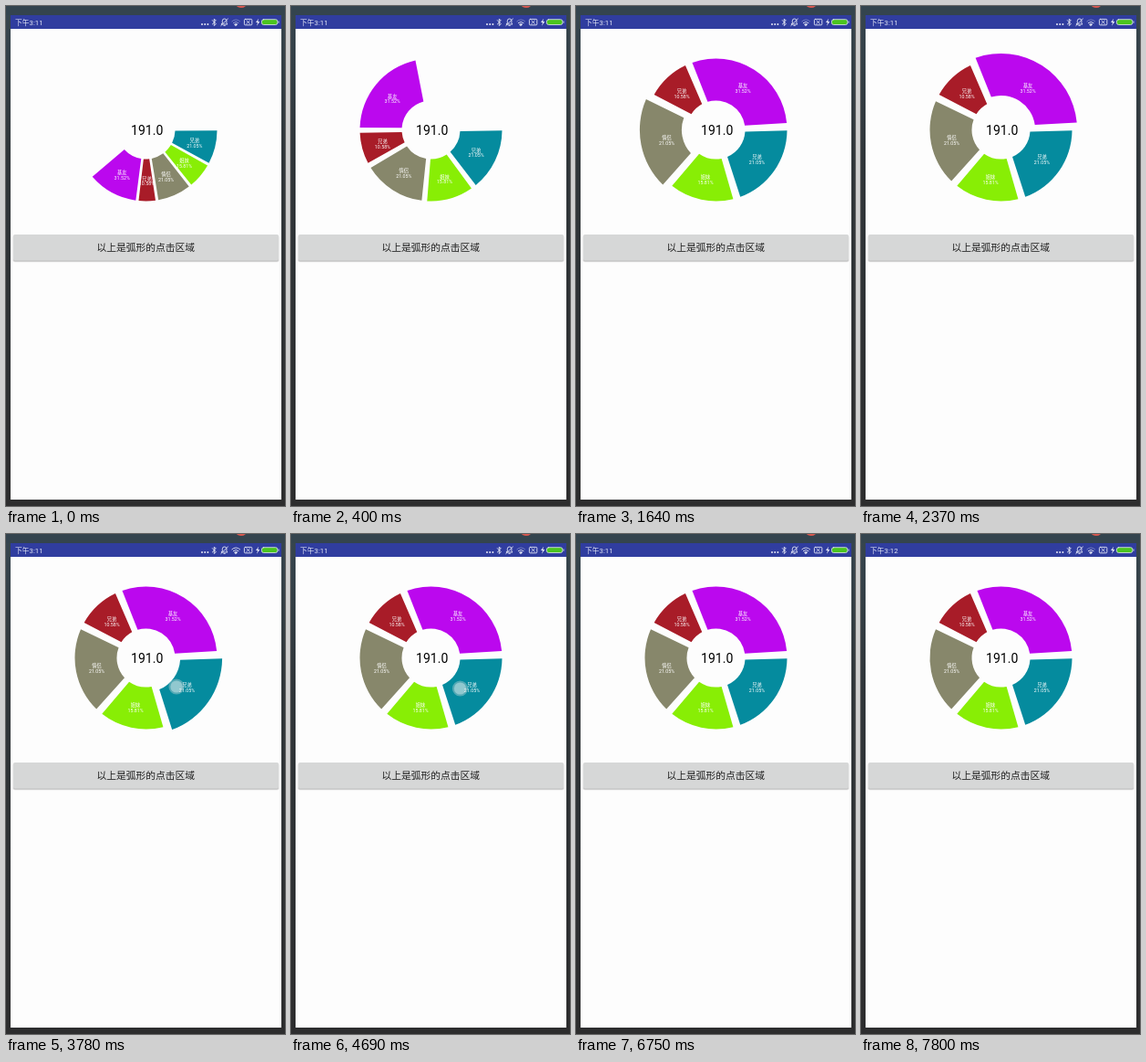
An HTML page for the animation above (8 s loop, 306 by 547 pixels).

```html
<!DOCTYPE html>
<html lang="zh-CN">
<head>
<meta charset="utf-8">
<title>Ring chart</title>
<style>
  html, body { margin: 0; width: 100%; height: 100%; overflow: hidden; background: #2e2e2f; }
  svg { display: block; width: 306px; height: 547px; }
  text { font-family: Roboto, "Noto Sans CJK SC", "Noto Sans CJK", sans-serif; text-anchor: middle; }
  .label { font-size: 5.3px; fill: #fff; }
  .icon { fill: none; stroke: #e4e7f5; stroke-width: .9; stroke-linecap: round; stroke-linejoin: round; }
</style>
</head>
<body>
<svg viewBox="0 0 306 547" xmlns="http://www.w3.org/2000/svg">
  <defs>
    <linearGradient id="edge" x2="0" y2="1">
      <stop offset="0" stop-color="#37464f"/>
      <stop offset=".3" stop-color="#30363a"/>
      <stop offset="1" stop-color="#2d2d2e"/>
    </linearGradient>
  </defs>
  <rect width="306" height="547" fill="url(#edge)"/>
  <rect width="306" height="10" fill="#34444e"/>
  <circle cx="258" cy="-4.5" r="6.6" fill="#d9584f"/>
  <rect x="5" y="10" width="297" height="530" fill="#fdfdfd"/>
  <rect x="5" y="10" width="297" height="15" fill="#303d9f"/>

  <text id="clock" x="10" y="20.8" font-size="7.8" fill="#e4e7f5" style="text-anchor:start"></text>
  <g fill="#e4e7f5">
    <circle cx="215" cy="20" r="1"/><circle cx="218.2" cy="20" r="1"/><circle cx="221.4" cy="20" r="1"/>
    <path d="M277 13.8l-3 4.3h2l-1 3.6 3.3-4.6h-2z"/>
  </g>
  <g class="icon">
    <path d="M226.3 15.6l4 4-2 2v-7.6l2 2-4 4"/>
    <path d="M236.3 20h6.6l-1-1.5v-2.2a2.3 2.3 0 0 0-4.6 0v2.2zM238.9 21.4h1.4M235.8 21.5l7.6-7.5"/>
    <rect x="261.4" y="14.4" width="8.4" height="6.4" rx="1"/>
    <path d="M264 16l3.2 3.2M267.2 16l-3.2 3.2"/>
    <path id="outer" d="M247.8 16.8q4.4-3.8 8.8 0"/>
    <path id="middle" d="M249.3 18.5q2.9-2.4 5.8 0"/>
    <path d="M250.8 20.1q1.4-1.1 2.8 0l-1.4 1.3z" fill="#e4e7f5"/>
    <rect x="280.4" y="14.7" width="17.4" height="5.8" rx="2.2" fill="#4bc41f" stroke-width=".8"/>
    <path d="M299 16.8v1.6" stroke-width=".8"/>
  </g>

  <g id="chart"></g>
  <text x="154.7" y="141.4" font-size="14" fill="#000">191.0</text>

  <rect x="7.5" y="251" width="292" height="29.3" rx="2" fill="#000" opacity=".1"/>
  <rect x="8" y="251" width="291" height="28.4" rx="2" fill="#000" opacity=".16"/>
  <rect x="8" y="250" width="291" height="28.4" rx="1.6" fill="#d6d7d7"/>
  <text x="153.3" y="268.4" font-size="10.75" fill="#202020">以上是弧形的点击区域</text>

  <g id="touch">
    <circle r="8.6" fill="#ddd" opacity=".36"/>
    <circle r="6.6" fill="#fff" opacity=".36"/>
  </g>
</svg>
<script>
const LOOP = 8000, CX = 153.5, CY = 135.5;
const INNER = 32, OUTER = 78, POP = 5.6;
// Degrees: first edge, gap on the outer rim, extra inset of each edge on the inner rim
const START = .5, GAP = 6, INSET = 3;

const slices = [
  { name: '兄弟', pct: 21.05, color: '#058b9e' },
  { name: '姐妹', pct: 15.81, color: '#88ee05' },
  { name: '情侣', pct: 21.05, color: '#87876b' },
  { name: '兄弟', pct: 10.58, color: '#a81c28' },
  { name: '基友', pct: 31.52, color: '#bb08ee' }
];
const [TEAL, GREEN, GREY, RED, PURPLE] = [0, 1, 2, 3, 4], NONE = -1;

// [time, progress of the opening sweep before easing]
const sweep = [[0, .43], [120, .495], [240, .56], [400, .649], [540, .715],
  [660, .77], [780, .83], [940, .91], [1090, .975], [1240, 1]];
// [time, raised slice]
const raised = [[0, NONE], [1370, GREY], [2100, PURPLE], [3080, RED], [3780, TEAL],
  [4690, NONE], [5510, PURPLE], [6060, NONE], [6870, GREEN], [7530, NONE]];
// [down, up, x, y]
const touches = [[1370, 1640, 94, 149], [2100, 2370, 168, 87], [3080, 3360, 114.5, 89],
  [3780, 4050, 187, 167], [4690, 4970, 185.5, 169], [5510, 5900, 166, 99],
  [6060, 6320, 162, 93.5], [6870, 7110, 121, 174], [7530, 7800, 120, 173.5]];
// [time, wifi strength]
const wifi = [[0, 1], [120, 2], [940, 3], [1640, 2], [3640, 3], [4570, 2], [5390, 3], [7530, 2]];
const clock = [[0, '下午3:11'], [7800, '下午3:12']];

const $ = id => document.getElementById(id);
const at = (steps, t) => steps.filter(s => s[0] <= t).pop()[1];
const ease = x => (1 - Math.cos(Math.PI * x)) / 2;

function make(tag, attrs, parent) {
  const el = document.createElementNS('http://www.w3.org/2000/svg', tag);
  for (const k in attrs) el.setAttribute(k, attrs[k]);
  return parent.appendChild(el);
}

function polar(r, deg) {
  const a = deg * Math.PI / 180;
  return [CX + r * Math.cos(a), CY + r * Math.sin(a)];
}

function ring(r, R, a, b, inset) {
  return `M${polar(R, a)}A${R} ${R} 0 0 1 ${polar(R, b)}` +
    `L${polar(r, b - inset)}A${r} ${r} 0 0 0 ${polar(r, a + inset)}Z`;
}

let angle = 0;
for (const s of slices) {
  s.from = angle;
  s.to = angle + (360 - GAP * slices.length) * s.pct / 100;
  angle = s.to + GAP;
  s.path = make('path', { fill: s.color }, $('chart'));
  s.label = make('g', { class: 'label' }, $('chart'));
  make('text', { y: .2 }, s.label).textContent = s.name;
  make('text', { y: 6 }, s.label).textContent = s.pct.toFixed(2) + '%';
}

function draw(t) {
  const p = ease(at(sweep, t)), up = at(raised, t);
  slices.forEach((s, i) => {
    const lift = i === up ? POP : 0, a = START + s.from * p, b = START + s.to * p;
    s.path.setAttribute('d', ring(INNER + lift, OUTER + lift, a, b, INSET * p));
    const [x, y] = polar((INNER + OUTER) / 2, (a + b) / 2);
    s.label.setAttribute('transform', `translate(${x} ${y})`);
  });

  const dot = touches.find(d => t >= d[0] && t < d[1]);
  $('touch').style.display = dot ? '' : 'none';
  if (dot) $('touch').setAttribute('transform', `translate(${dot[2]} ${dot[3]})`);

  const bars = at(wifi, t);
  $('outer').style.opacity = bars > 2 ? 1 : .4;
  $('middle').style.opacity = bars > 1 ? 1 : .6;
  $('clock').textContent = at(clock, t);
}

const start = performance.now();
function tick() {
  draw((performance.now() - start) % LOOP);
  requestAnimationFrame(tick);
}
tick();
</script>
</body>
</html>
```
